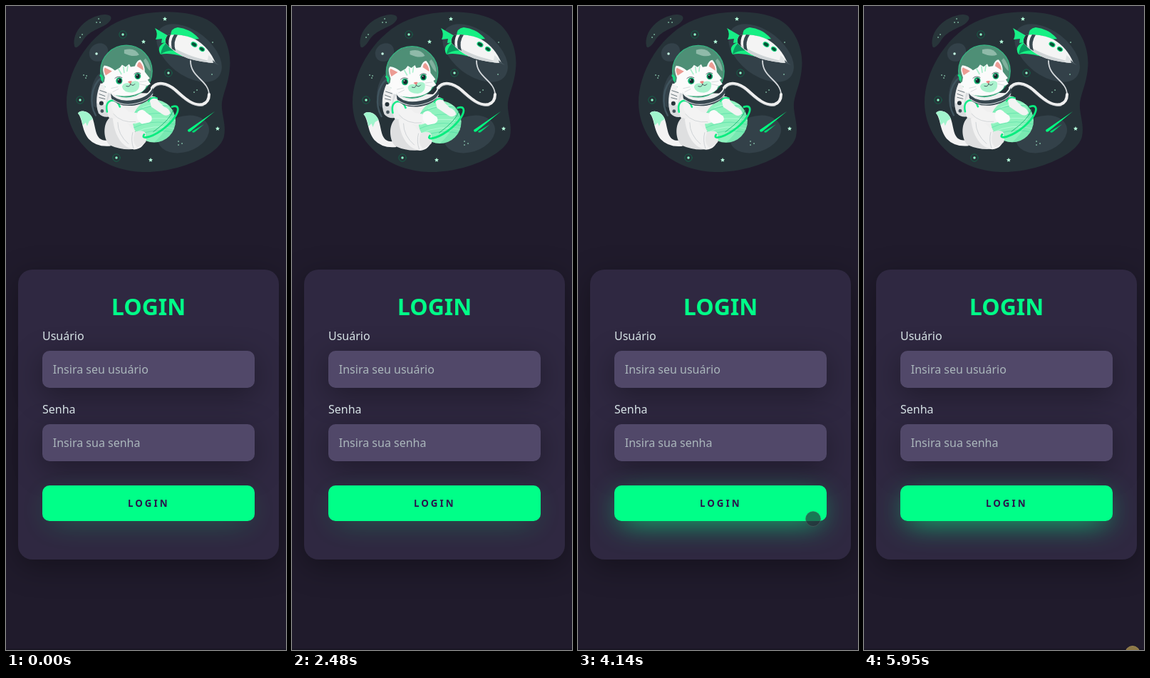
These frames come from a looping animation (393 px wide and 904 px high, 6020 ms). An HTML page:

```html
<!DOCTYPE html>
<html lang="pt-BR">
<head>
<meta charset="utf-8">
<title>Login</title>
<style>
  html, body { margin: 0; width: 100%; height: 100%; overflow: hidden; background: #201b2c; }
  div { position: absolute; box-sizing: border-box; }
  svg { position: absolute; left: 0; top: 0; }
  .card { left: 16.6px; top: 370px; width: 366.4px; height: 407px; border-radius: 20px; background: #2f2841; box-shadow: 0 10px 40px #00000056; }
  .field { left: 51px; width: 297.5px; height: 51.8px; border-radius: 10px; background: #514869; box-shadow: 0 10px 40px #00000056; }
  .button { left: 51px; top: 672.6px; width: 297.5px; height: 50px; border-radius: 10px; background: #00ff88; }
  .edge { left: 0; top: 902px; width: 393px; height: 2px; background: #1a1624; }
  text { font: 16px "Noto Sans", sans-serif; fill: #f0ffffde; }
  .hint { fill: #abb7bc; }
  .title { font-size: 32px; font-weight: 800; fill: #00ff88; text-anchor: middle; }
  .action { font-size: 13.33px; font-weight: 800; letter-spacing: 3px; fill: #2b134b; }
</style>
</head>
<body>
<div class="card"></div>
<div class="field" style="top:484px"></div>
<div class="field" style="top:586.8px"></div>
<div class="button" id="button"></div>
<div class="edge"></div>

<svg width="393" height="904" viewBox="0 0 393 904" fill="none" stroke-linecap="round" stroke-linejoin="round">
  <defs>
    <g id="orb"><circle r="5.2" stroke="#126b4c" stroke-width=".8"/><circle r="1.7" fill="#8dffc9"/></g>
    <path id="star" d="M0-3 .9-.9 3-.8 1.4.7 1.9 2.8 0 1.7-1.9 2.8-1.4.7-3-.8-.9-.9Z" fill="#b5ffdc"/>
    <clipPath id="globe"><circle cx="208" cy="161" r="30"/></clipPath>
    <clipPath id="dome"><circle cx="169" cy="91" r="36"/></clipPath>
  </defs>

  <!-- Space backdrop -->
  <g fill="#263238">
    <path d="M85 138C84 96 112 45 155 23C190 5 250 3 282 19C305 31 317 61 314 88C312 113 302 126 303 143C304 157 309 168 306 183C300 210 240 234 192 233C132 231 87 190 85 138Z"/>
    <path d="M96 56C92 36 113 14 138 12C148 12 151 17 143 24C133 32 119 33 109 47C103 57 97 61 96 56Z" fill="#28353a"/>
  </g>
  <g fill="#334149">
    <ellipse cx="257" cy="66" rx="53" ry="31" transform="rotate(38 257 66)"/>
    <ellipse cx="249" cy="180" rx="37" ry="25" transform="rotate(-18 249 180)"/>
    <ellipse cx="130" cy="65" rx="14" ry="12" transform="rotate(-40 130 65)"/>
    <ellipse cx="131" cy="118" rx="11" ry="25" transform="rotate(12 131 118)"/>
  </g>
  <use href="#orb" x="164" y="40"/><use href="#orb" x="228" y="94"/>
  <use href="#orb" x="104" y="132"/><use href="#orb" x="155" y="213"/>
  <use href="#star" x="193" y="50"/><use href="#star" x="297" y="172"/>
  <use href="#star" x="203" y="216"/><use href="#star" x="223" y="18"/>
  <path d="M127 67h.1" stroke="#c5ffe4" stroke-width="3.4"/>
  <path d="M130 18h.1M127 23h.1M132 23h.1M104 44h.1M107 40h.1M109 97h.1M113 98h.1M112 101h.1M264 121h.1M268 118h.1M290 51h.1M289 96h.1M242 190h.1M247 193h.1M242 195h.1" stroke="#a9f5d0" stroke-width="1.6"/>
  <path d="M293 148 255 174Q255 178 259 176Z" fill="#00ff80"/>
  <path d="M278 166 261 176Q262 179 265 177Z" fill="#00d873"/>

  <!-- Tether and rocket -->
  <path d="M285 125C285 104 259 101 259 77" stroke="#d5d9dc" stroke-width="1.8"/>
  <path d="M205 115C212 105 226 108 238 118C251 130 263 141 276 138Q285 135 285 124" stroke="#efefef" stroke-width="4"/>
  <path d="M206 117C213 107 226 109.500 237 120C250 132 264 143 277 140" stroke="#b9bec2" stroke-width=".8"/>
  <g>
    <path d="M231 42Q231 31 241 30Q259 32 271 46L262 47Q248 38 231 42Z" fill="#16ef83"/>
    <path d="M228 42 209 31Q214 39 210 47L219 46 218 52 228 51Z" fill="#17ef86"/>
    <path d="M229 49Q209 55 217 68Q228 65 249 71L240 58Z" fill="#16ef83"/>
    <path d="M229 50Q219 54 217 68Q226 61 241 63Z" fill="#0b9a60"/>
    <path d="M227 41Q247 38 266 47Q285 58 294 80Q274 79 257 74Q238 68 224 52Q223 45 227 41Z" fill="#f4f4f4"/>
    <path d="M224 52Q246 66 266 72Q281 76 294 80Q274 79 257 74Q238 68 224 52Z" fill="#cfd4d6"/>
    <path d="M227 41 231 40.500Q227 48 229 57L224 52Q223 45 227 41Z" fill="#263238"/>
    <path d="M236 40 241 40.500Q234 50 238 63L233 60Q230 49 236 40Z" fill="#37474f"/>
    <path d="M284 69Q290 73 294 80Q288 80 281 79Q284 75 284 69Z" fill="#dfe3e4"/>
    <path d="M290 76 299 83 291 80Z" fill="#46555d"/>
    <g fill="#064f36" stroke="#18d982" stroke-width="1.2"><ellipse cx="264" cy="54" rx="4.2" ry="2.8" transform="rotate(30 264 54)"/><ellipse cx="275" cy="60.500" rx="3.8" ry="2.600" transform="rotate(32 275 60.500)"/></g>
  </g>

  <!-- Floating cat -->
  <g id="cat">
    <path d="M143 188C125 190 127 173 122 158C118 147 105 144 101 150C108 158 106 173 116 186Q127 198 147 196Z" fill="#f3f3f3"/>
    <path d="M122 158C118 147 105 144 101 150C106 155 106 160 108 167L112 163 114 168 117 161Z" fill="#a1f5cd"/>
    <path d="M126 153C117 137 119 112 134 100" stroke="#40545e" stroke-width="2.5"/>
    <path d="M133 108C127 120 125 138 130 150Q137 158 149 154L151 113Z" fill="#d9dcde"/>
    <path d="M133 108Q128 120 128 136L140 139 145 112Z" fill="#f0f0f0"/>
    <path d="M132 118l9 3M131 123l8 3M131 128l8 2" stroke="#68757b" stroke-width="1"/>
    <circle cx="134" cy="136" r="3" fill="#263238"/><circle cx="135" cy="147" r="2.4" fill="#46555d"/>
    <path d="M148 121Q136 140 146 159C156 178 178 181 194 171Q211 154 205 122Z" fill="#efefef"/>
    <path d="M146 156C135 165 137 188 146 195Q164 203 183 200Q190 194 184 181Q166 179 159 160Z" fill="#dedfe0"/>

    <!-- Planet, leg and paws -->
    <circle cx="208" cy="161" r="30" fill="#8ef2be"/>
    <g clip-path="url(#globe)">
      <path d="M178 150Q207 133 238 142M177 159Q208 144 240 154M178 171Q207 157 238 166M182 182Q208 170 237 177" stroke="#6ce6b0" stroke-width="1.2"/>
      <path d="M181 165Q205 152 239 160M181 177Q207 164 238 172M192 142Q212 134 231 139" stroke="#b5fbd8" stroke-width="1"/>
      <path d="M226 132Q240 163 208 191L242 192V140Z" fill="#3acb8d" opacity=".25"/>
    </g>
    <path d="M150 158C161 151 172 166 181 176Q193 175 197 184Q194 200 180 201C164 198 153 184 150 158Z" fill="#f2f2f2"/>
    <path d="M157 163Q157 180 172 193M178 177Q175 188 179 199" stroke="#c6cbce" stroke-width=".8"/>
    <path d="M181 177Q192 172 196 178L197 188Q197 193 184 198Q176 190 181 177Z" fill="#e8e8e8"/>
    <path d="M233 141C242 138 244 144 238 154C229 168 210 182 196 184Q191 184 194 180" stroke="#08ec7f" stroke-width="2.8"/>
    <path d="M235 145Q232 158 207 176" stroke="#0aaa67" stroke-width=".8"/>
    <path d="M148 133C156 128 164 141 173 148Q186 150 192 151Q196 162 182 164C163 168 145 150 148 133Z" fill="#f3f3f3"/>
    <path d="M151 151Q162 164 182 162" stroke="#d3d7d9" stroke-width="1"/>
    <path d="M142 148Q139 134 149 132Q157 132 160 141" stroke="#18ec89" stroke-width="2.6"/>
    <path d="M185 148Q191 142 197 149L204 154Q207 160 201 163L191 165Q181 159 185 148Z" fill="#fafafa"/>
    <path d="M201 128Q211 123 214 133L222 141Q229 143 231 150Q226 156 219 151L204 141Z" fill="#f3f3f3"/>
    <path d="M200 133Q205 126 212 129" stroke="#18ec89" stroke-width="2.2"/>

    <!-- Helmet and head -->
    <circle cx="169" cy="91" r="36.3" fill="#4e8f76" stroke="#35b883" stroke-width="1.2"/>
    <g clip-path="url(#dome)">
      <path d="M166 61Q181 57 187 68Q179 72 166 66Z" fill="#a4c9ba" opacity=".75"/>
      <path d="M196 73Q203 81 203 91Q198 88 193 76Z" fill="#a4c9ba" opacity=".6"/>
    </g>
    <path d="M139 100Q134 87 138 83Q146 84 153 90L160 86 163 82 168 85 173 81 175 85 181 84Q184 75 189 75Q195 82 195 92L202 101 199 103 203 109 197 112Q195 120 181 124Q161 129 143 121L138 117 140 113 134 109 138 106Z" fill="#fbfbfb"/>
    <path d="M140 97Q136 88 139 86L149 91Z" fill="#ec9c94"/>
    <path d="M184 84Q185 78 188 78Q193 83 193 90Z" fill="#ec9c94"/>
    <path d="M158 88l4 7M165 85l1 8M171 84l-1 7" stroke="#a8f0cc" stroke-width="1.6"/>
    <path d="M163 113Q164 107 173 108Q182 102 187 107Q189 119 177 121Q165 121 163 113Z" fill="#aaf2ce"/>
    <g>
      <ellipse cx="159" cy="104.500" rx="4.6" ry="4.8" fill="#15b574"/><ellipse cx="185" cy="98" rx="4.4" ry="4.6" fill="#15b574"/>
      <ellipse cx="159.500" cy="104.500" rx="2.8" ry="3.3" fill="#17252b"/><ellipse cx="185" cy="98" rx="2.7" ry="3.2" fill="#17252b"/>
      <path d="M158 103h.1M184 96.500h.1" stroke="#fff" stroke-width="1.4"/>
    </g>
    <path d="M153 101Q157 97 163 100M180 95Q184 91 189 94" stroke="#37474f" stroke-width=".8"/>
    <path d="M171 106Q174 104 177 105L175 109Z" fill="#e8837f"/>
    <path d="M175 109Q174 114 169 112M175 109Q178 113 181 109" stroke="#34474e" stroke-width=".9"/>
    <path d="M157 113l-9 2M158 116l-8 4M188 106l9-1M188 109l9 2" stroke="#c2c9cb" stroke-width=".6"/>
    <path d="M147 121Q157 135 181 130Q202 126 206 112L207 121Q203 135 181 139Q157 142 148 129Z" fill="#37474f"/>
    <path d="M147 121Q157 135 181 130Q202 126 206 112" stroke="#eef1f1" stroke-width="1.8"/>
    <path d="M150 131Q164 141 184 136Q201 132 206 123" stroke="#d6dcdf" stroke-width="1.1"/>
    <path d="M133 97Q136 99 135 103" stroke="#16dc82" stroke-width="3"/>
  </g>

  <text class="title" x="200" y="433.6">LOGIN</text>
  <text x="51" y="468.6">Usuário</text>
  <text class="hint" x="65.8" y="515.6">Insira seu usuário</text>
  <text x="51" y="571.6">Senha</text>
  <text class="hint" x="65.8" y="618.6">Insira sua senha</text>
  <text class="action" x="171" y="702.6">LOGIN</text>
  <circle id="touch" r="10.5" stroke-width="1"/>
</svg>

<script>
const LOOP = 6020, BOB = 1500;
const [cat, button, touch] = ["cat", "button", "touch"].map(id => document.getElementById(id));
// time, x, y
const path = [[3570, 405, 741], [3830, 345, 719], [4080, 330, 720], [4750, 330, 720], [5280, 364, 737], [5950, 377, 909], [6020, 377, 909]];
const clamp = v => Math.max(0, Math.min(1, v));
const smooth = v => v * v * (3 - 2 * v);
const mix = (a, b, k) => a + (b - a) * k;

function moveTouch(t) {
  const i = path.findIndex((p, n) => n < path.length - 1 && t >= p[0] && t < path[n + 1][0]);
  touch.style.display = i < 0 ? "none" : "";
  if (i < 0) return;
  const [from, to] = [path[i], path[i + 1]];
  const k = smooth((t - from[0]) / (to[0] - from[0]));
  const y = mix(from[2], to[2], k);
  touch.setAttribute("cx", mix(from[1], to[1], k));
  touch.setAttribute("cy", y);
  touch.setAttribute("fill", y > 895 ? "#8b7746" : "#242a34a0");
  touch.setAttribute("stroke", y > 895 ? "#9a8552" : "#56646888");
}

function draw() {
  const t = performance.now() % LOOP;
  const bob = 2.2 * (1 + Math.cos(2 * Math.PI * (t - 585) / BOB));
  cat.setAttribute("transform", `translate(${-bob / 4} ${bob})`);
  const glow = smooth(clamp((t - 3760) / 300));
  button.style.boxShadow = `0 10px 40px ${mix(-12, -10, glow)}px rgba(0,255,${mix(128, 136, glow)},${mix(.32, .8, glow)})`;
  moveTouch(t);
  requestAnimationFrame(draw);
}
draw();
</script>
</body>
</html>
```
